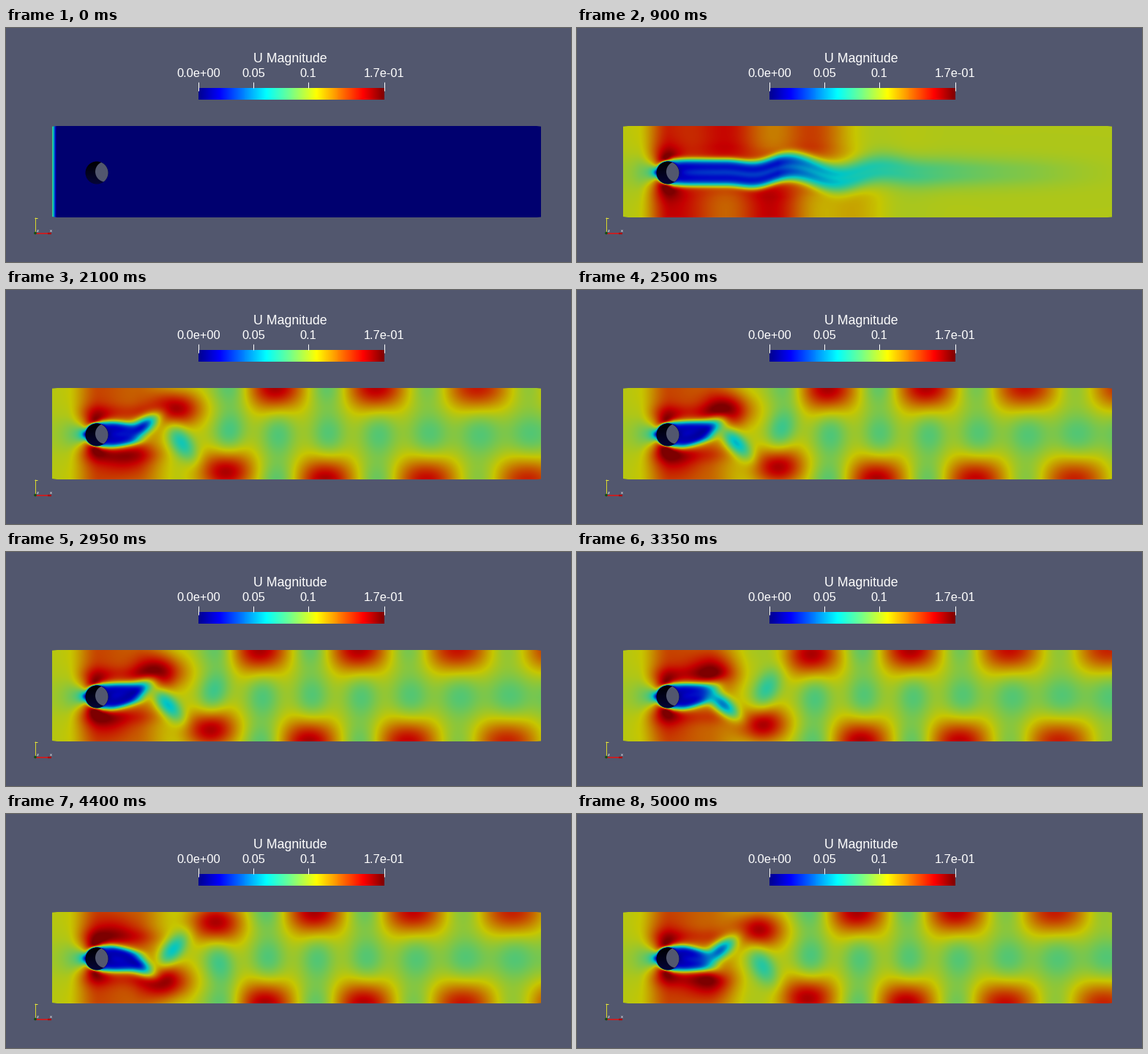
Animation, 772 px wide and 320 px high, one loop 5.05 s. Source, as a matplotlib script:

```python
import numpy as np
import matplotlib.pyplot as plt
from matplotlib.animation import FuncAnimation
from matplotlib.colors import LinearSegmentedColormap
from matplotlib.patches import Circle, Polygon

W, H, DPI = 772, 320, 100
FRAMES, STEP = 101, 50
LEFT, RIGHT, TOP, BOTTOM = 63, 731, 134, 259
VMAX = 0.169
LIGHT = 0.78
BACK = (82 / 255, 87 / 255, 110 / 255)
RADIUS = 15.5
WAVE = 135.0          # vortex spacing in pixels
RATE = 0.226          # shedding cycles per frame

JET = LinearSegmentedColormap.from_list("jet_like", [
    (0, (0, 0, .5625)), (.111, (0, 0, 1)), (.365, (0, 1, 1)),
    (.508, (.5, 1, .5)), (.635, (1, 1, 0)), (.889, (1, 0, 0)),
    (1, (.5, 0, 0))], N=512)

xs = np.arange(LEFT, RIGHT) + 0.5
ys = np.arange(TOP, BOTTOM) + 0.5 - 196.5
X, Y = np.meshgrid(xs, ys)


def ease(t):
    t = np.clip(t, 0, 1)
    return t * t * (3 - 2 * t)


def bell(t):
    return np.exp(-0.5 * t * t)


def potential_flow():
    """Relative speed around a cylinder between two slip walls."""
    z = (X - 124) + 1j * (Y - 1)
    k = np.pi / (BOTTOM - TOP)
    speed = np.abs(1 - (RADIUS * k / np.sinh(k * z)) ** 2)
    speed = np.where(speed > 1, 1 + 0.6 * (speed - 1), speed)
    layer = 1 - np.exp(-np.maximum(np.abs(z) - 15, 0) / 1.8)
    return np.minimum(speed, 1.45) * layer


FLOW = potential_flow() * 0.102
RISE = ease((X - 82) / 46)
SHOULDER = np.exp(-((np.abs(Y) - 28) / 12) ** 2)


def top_crest(n):
    """Place of one fast spot at the upper wall."""
    late = 22 * (1 - ease((n - 18) / 14))
    return 207 + WAVE * (RATE * (n - 50) % 1) + late


def early_wake(n):
    """Straight wake growing behind the cylinder, then starting to sway."""
    k = min(n, 20)
    sway = ease((n - 11) / 7)
    turn = 2 * np.pi / WAVE
    x0 = top_crest(n)
    swing = 8 * sway * ease((X - 200) / 80) * (1 - ease((X - 350) / 160))
    mid = 1 + swing * np.cos(turn * (X - x0 - 27))
    eta = np.abs(Y - mid)

    fade = 1 - ease((X - 140 - 6 * k) / (11 * k))
    v = FLOW + ease(k / 8) * RISE * fade * (0.036 + 0.004 * SHOULDER)
    v += (0.014 * sway * np.cos(turn * (X - x0)) * np.clip(-Y / 35, -1, 1)
          * bell((X - 270) / 85))

    depth = 0.86 * np.exp(-np.maximum(X - 145 - 7.2 * k, 0) / (9 * k))
    depth *= 1 - ease((X - 139 - 26 * k) / (10 * k + 10))
    depth *= ease((X - 120) / 14)
    far = ease((X - 180) / 240)
    shape = np.exp(-(eta / (18.5 + 1.5 * far)) ** (5 - 3 * far))
    return v * (1 - depth * shape * (1 - 0.1 * np.exp(-(eta / 5) ** 2)))


def add_vortex(v, keep, x, side):
    """Fast spot near one wall with slow spots opposite; side -1 is up."""
    reach = np.clip(32 + 0.25 * (x - 225), 32, 63)
    far = ease((x - 230) / 110)
    aged = ease((x - 420) / 300)

    amp = ease((x - 95) / 60) * (0.02 + 0.035 * ease((x - 150) / 80))
    amp -= 0.013 * aged
    wide = 24 + 3 * far + 6 * aged
    v += amp * np.outer(bell((ys - side * reach) / (17 + 5 * far)),
                        bell((xs - x) / wide))

    amp = 0.021 * ease((x - 235) / 50) * (1 - 0.3 * aged)
    v -= amp * np.outer(bell((ys + side * 64) / 20),
                        bell((xs - x - 12 * (1 - far) - 3) / (18 + 4 * aged)))

    bx = x + 4 + 31 * np.exp(-(x - 140) / 40)
    depth = ease((x - 100) / 40) * (
        0.2 + 0.6 * np.exp(-max(bx - 185, 0) / 42))
    by = -side * 11 * ease((bx - 160) / 30) * (1 - far) + 1
    tilt = np.radians(np.clip(30 + 0.4 * (bx - 175), 30, 90))
    dx, dy = X - bx, side * (Y - by)
    along = dx * np.cos(tilt) - dy * np.sin(tilt)
    across = dx * np.sin(tilt) + dy * np.cos(tilt)
    grow = ease((bx - 185) / 155)
    keep *= 1 - depth * bell(along / (18 + 5 * grow)) * bell(
        across / (7.5 + 9 * grow + 6 * aged))


def vortex_street(n):
    x0 = top_crest(n)
    stretch = 0.09 * (1 - ease((n - 34) / 12))
    fade = 1 - ease((X - 178) / 62)
    v = FLOW + RISE * fade * (0.024 + 0.012 * SHOULDER)
    keep = np.ones_like(v)
    for i in range(-5, 11):
        x = x0 + i * WAVE / 2
        x += stretch * max(x - 394, 0)
        if 95 < x < 830:
            add_vortex(v, keep, x, -1 if i % 2 == 0 else 1)

    lean = np.cos(2 * np.pi * (x0 - 202) / WAVE)
    mid = 1 - 5 * lean * ease((X - 140) / 40)
    eta = np.abs(Y - mid)
    half = 17 - 5 * ease((X - 140) / 45)
    core = 0.87 / (1 + np.exp((eta - half) / 2.2))
    core *= 1 - 0.08 * np.exp(-(eta / 5) ** 2)
    core *= ease((X - 120) / 14) / (1 + np.exp((X - 179) / 6))
    return v * keep * (1 - core)


def speed_at(n):
    if n == 0:
        return 0.085 * np.clip(1 - (X - LEFT) / 6, 0, 1)
    if n <= 19:
        return early_wake(n)
    if n >= 35:
        return vortex_street(n)
    mix = ease((n - 19 - np.maximum(X - 200, 0) / 45) / 4)
    return (1 - mix) * early_wake(n) + mix * vortex_street(n)


def shade(v):
    return JET(np.clip(v / VMAX, 0, 0.97))[..., :3] * LIGHT


fig = plt.figure(figsize=(W / DPI, H / DPI), dpi=DPI, facecolor=BACK)
ax = fig.add_axes([0, 0, 1, 1])
ax.axis("off")


def picture(data, box, **kw):
    return ax.imshow(data, extent=box, aspect="auto", **kw)


def label(x, y, text, px, **kw):
    ax.text(x, y, text, color="white", ha="center", va="baseline",
            family="Liberation Sans", fontsize=px * 72 / DPI, **kw)


def line(x, y, color, width=1):
    ax.plot(x, y, color=color, lw=width * 72 / DPI, solid_capstyle="butt")


# Flow field
field = picture(shade(speed_at(0)), (LEFT, RIGHT, BOTTOM, TOP),
                interpolation="nearest")
outline = Polygon([(63, 134.7), (70, 134), (725, 134), (731, 134.7),
                   (731, 258.5), (725, 259), (70, 259), (63, 258)],
                  fc="none", ec="none")
ax.add_patch(outline)
field.set_clip_path(outline)

# Cylinder bore, seen slightly from the side
rim = Circle((124, 198), RADIUS, fc="none", ec="none")
ax.add_patch(rim)
tone = np.linspace(0, 1, 32)[:, None, None] * np.array([0.02, 0.02, 0.22])
bore = picture(tone, (108, 140, 214, 182), interpolation="bilinear", zorder=2)
bore.set_clip_path(rim)
rear = Circle((136, 196.5), 14, fc=BACK, ec="none", zorder=3)
ax.add_patch(rear)
rear.set_clip_path(rim)

# Colour legend
picture(JET(np.linspace(0, 1, 256))[None, :, :3], (263, 517, 98, 82),
        interpolation="nearest")
label(388.8, 47, "U Magnitude", 17.8)
for x, text, end in ((262.5, "0.0e+00", 86), (337.5, "0.05", 82),
                     (412.5, "0.1", 82), (516.5, "1.7e-01", 86)):
    line([x, x], [74, end], "white")
    label(x + 0.5, 67, text, 16.4)

# Axis marker
line([39.5, 39.5], [280, 259], "#d8d82a")
line([39, 43], [259.5, 259.5], "#e6e640")
line([40, 62], [280.5, 280.5], "#e01414", 1.6)
line([57, 62], [280.5, 280.5], "#b00c0c", 2.4)
ax.add_patch(Circle((40, 280.5), 1.8, fc="#145014", ec="none", zorder=4))
label(61, 279, "x", 6)
label(43.5, 279, "z", 6)

ax.set_xlim(0, W)
ax.set_ylim(H, 0)


def draw(n):
    field.set_data(shade(speed_at(n)))
    return [field]


anim = FuncAnimation(fig, draw, frames=FRAMES, interval=STEP, repeat=True,
                     repeat_delay=0, blit=False)
plt.show()
```
